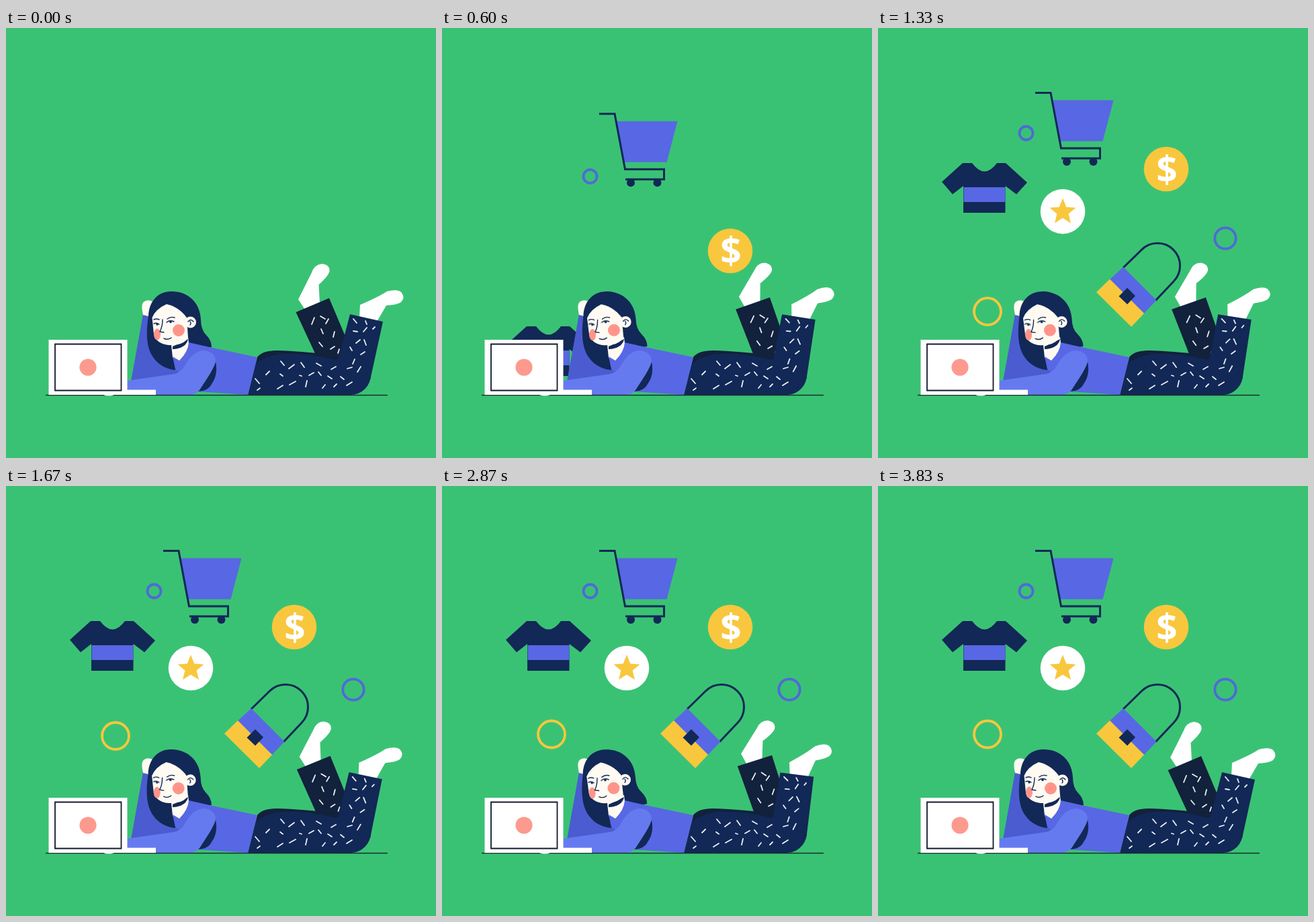
An HTML page without scripts for the animation above (3860 ms loop, 640x640 px).

```html
<!DOCTYPE html>
<html lang="en">
<head>
<meta charset="utf-8">
<title>Shopping from the floor</title>
<style>
  @property --t { syntax: "<number>"; inherits: true; initial-value: 0; }

  html, body { margin: 0; width: 100%; height: 100%; overflow: hidden; background: #3ac274; }

  svg {
    display: block; width: 100%; height: 100%;
    --navy: #122856; --ink: #12213c; --purple: #5867e4; --gold: #f8c73e; --skin: #fffaf2; --blush: #ff958a;
    /* sway: 0 to 1 and back, twice per loop */
    --s: calc((1 - cos(var(--t) * .18653deg)) / 2);
    animation: clock 3860ms linear infinite;
  }
  @keyframes clock { from { --t: 0; } to { --t: 3860; } }

  /* exponential rise, one item about every 116 ms */
  .item {
    transform: translateY(calc(1px * max(0, 980 * exp(.0054 * (116 * var(--i) - var(--t))) - 7)));
  }

  .back-leg  { transform-origin: 500px 510px; transform: rotate(calc(5.3deg * var(--s))); }
  .front-leg { transform-origin: 513px 516px; transform: rotate(calc(-5.5deg * var(--s))); }
  .head      { transform-origin: 250px 495px; transform: rotate(calc(-2deg * var(--s))); }

  .open   { animation: open 3860ms step-end infinite; }
  .closed { opacity: 0; animation: closed 3860ms step-end infinite; }
  @keyframes open   { 0%, 28.8% { opacity: 1; } 24.6% { opacity: 0; } }
  @keyframes closed { 0%, 28.8% { opacity: 0; } 24.6% { opacity: 1; } }

  .navy { fill: var(--navy); }
  .ink { fill: var(--ink); }
  .purple { fill: var(--purple); }
  .gold { fill: var(--gold); }
  .skin { fill: var(--skin); }
  .blush { fill: var(--blush); }
  .white { fill: #fff; }
  .line { fill: none; stroke: var(--navy); stroke-width: 3; }
  .thin { fill: none; stroke: var(--navy); stroke-width: 1.4; stroke-linecap: round; stroke-linejoin: round; }
  .ring { fill: none; stroke: #5069d8; stroke-width: 3.8; }
  .dash { fill: none; stroke: #eceef3; stroke-width: 1.8; stroke-linecap: round; }
  text { font: 700 55px "Open Sans", "Noto Sans", sans-serif; fill: #fff; text-anchor: middle; }
</style>
</head>
<body>
<svg viewBox="0 0 640 640">
  <defs>
    <clipPath id="floor"><path d="M0 0H640V546H0z"/></clipPath>
  </defs>

  <g clip-path="url(#floor)">
    <g class="item" style="--i:0">
      <path class="purple" d="M260 107.500H350.500L334.500 168.500H271z"/>
      <path class="line" d="M234 96.500H257L272.500 179H330.500V194H273"/>
      <circle class="navy" cx="281" cy="199" r="6"/>
      <circle class="navy" cx="320.500" cy="199" r="6"/>
    </g>
    <circle class="item ring" style="--i:1" cx="220.500" cy="156.500" r="10"/>
    <g class="item" style="--i:1.94">
      <circle class="gold" cx="429" cy="210" r="33.300"/>
      <text x="430" y="229.500">$</text>
    </g>
    <g class="item" style="--i:3">
      <path class="navy" d="M126 201H140Q158.500 226 177 201H190L222 230 206 247.500 189.500 235V275H127V235L111 247.500 95 229z"/>
      <path class="purple" d="M127.500 237H189.500V259H127.500z"/>
    </g>
    <g class="item" style="--i:4">
      <circle class="white" cx="275" cy="271" r="33.300"/>
      <path class="gold" d="M275 251.200 280.300 264.400 294.500 265.400 283.600 274.500 287 288.300 275 280.700 263 288.300 266.400 274.500 255.500 265.400 269.700 264.400z"/>
    </g>
    <circle class="item ring" style="--i:5" cx="517" cy="303" r="15.700"/>
    <g class="item" style="--i:6">
      <path class="line" d="M365 332 392.300 305.300A33.500 33.500 0 0 1 439.700 352.700L413 381"/>
      <path class="purple" d="M365 331 414.500 380.500 396 400 345 349.500z"/>
      <path class="gold" d="M345 349 396 400 377 420 325 368.500z"/>
      <path class="navy" d="M371 362 383 374 371 386.500 358.500 374.500z"/>
    </g>
    <circle class="item ring" style="--i:7;stroke:var(--gold)" cx="163" cy="369.500" r="20"/>
  </g>

  <!-- legs -->
  <g class="back-leg">
    <path class="white" d="M445 419 435 404 455 364Q459 352 470 351 482 352 481.500 362 480 369 465.500 382L467 410z"/>
    <path class="ink" d="M431.500 423 481 402 516 485 500 512 472 510z"/>
    <path class="dash" d="M455 441l4-10M468 429l7 4M480 433l-4 7M469 448l3 7M489 452l-2 8M466 468l5 6M483 478l6-4M496 478l-2 6"/>
  </g>
  <path class="ink" d="M371 502 374 490Q381 480 403 480 440 481 492 487V500z"/>
  <path class="navy" d="M360 546 371 501Q383 489 408 485 450 483 490 494L513 487V546z"/>
  <g class="front-leg">
    <path class="white" d="M526 431 527 412Q555 400 567 392 582 388 588 393 595 401 588 408 583 412 566 413L552 437z"/>
    <path class="navy" d="M512 426 561 437 542 524 513 520 490 510z"/>
    <circle class="navy" cx="513" cy="516" r="30"/>
    <path class="dash" d="M517 433l5 6M535 436l2 5M532 452l5-6M546 448l3-3M517 451l6 1M521 469l6-5M533 464l3 8M512 475l3 5M528 486l6-4M519 493l-3 7M523 512l5-8"/>
  </g>
  <path class="dash" d="M371 522l6 7M374 539l4-3M387 516l5-5M409 496l5 6M404 537l8-5M408 515l4 3M422 531l9-5M421 507l8-6M439 498l5 7M437 517l3 1M446 534l2-9M451 517l7-4M465 512l4 5M462 499l7 4M471 536l4-5M479 518l6 4M484 508l7-4M488 534l4-4M508 507l7-2M498 519l5 4M507 532l8-5"/>

  <!-- upper body -->
  <path fill="#4a5cd0" d="M204 426 186 526 262 516 252 470 222 428z"/>
  <path class="skin" d="M204 427Q200 410 206 407 212 403 220 408L224 432z"/>
  <path class="head navy" d="M246 392C226 392 213 407 212 428 208 455 209 476 219 490 227 502 240 508 252 509L268 482 306 475Q306 465 298 457 290 449 290 434C289 409 271 392 246 392z"/>
  <path class="skin" d="M246 472 271 460 273 478 258 497 248 491z"/>
  <path class="navy" d="M248 474 271 463Q268 477 248 478z"/>
  <path class="purple" d="M272 468 303 475 374 490 360 546 284 541 262 514 252 508 248 489 258 495Q271 482 272 468z"/>
  <path class="navy" d="M300 482 312 497Q316 516 306 530 300 541 284 541z"/>

  <g class="head">
    <circle class="skin" cx="274.500" cy="438" r="8.500"/>
    <path class="skin" d="M217.500 431Q223 418 239 411 257 415 269 431L271 461Q264 473 242 472 224 470 220 456z"/>
    <ellipse class="blush" cx="225" cy="456" rx="5" ry="8.500"/>
    <circle class="blush" cx="257" cy="450" r="9"/>
    <path class="thin" d="M271 437q4-5 8 0M274 437q2 3 0 5M220 434q4-2 8 0M240 433q5-4 11-2M233 434Q233 444 229 452L235 453M235 462q6 3 11-1"/>
    <g class="open">
      <path class="thin" d="M220 440q4-2 8 1M239 438q5-4 11-1"/>
      <circle class="navy" cx="225" cy="441" r="1.700"/>
      <circle class="navy" cx="245" cy="437.500" r="1.800"/>
    </g>
    <path class="thin closed" d="M220 439q4 3 9 1M240 437q6 4 12 1"/>
  </g>

  <path fill="#667af0" d="M180 525 250 515Q261 513 267 501 279 480 295 480 312 482 312 497 309 507 299 522L288 539Q283 546 272 546H180z"/>

  <!-- laptop and floor -->
  <path d="M59 546.500H568" stroke="#14302f" stroke-width="1.600"/>
  <path class="white" d="M63.500 464H180.500V538.500H223V546H161Q153 549 145 546H63.500z"/>
  <path d="M73 470.500H171.500V539.500H73z" fill="#fff" stroke="#14182c" stroke-width="1.800"/>
  <circle cx="122" cy="505" r="12.600" fill="#fc9a8e"/>
</svg>
</body>
</html>
```
